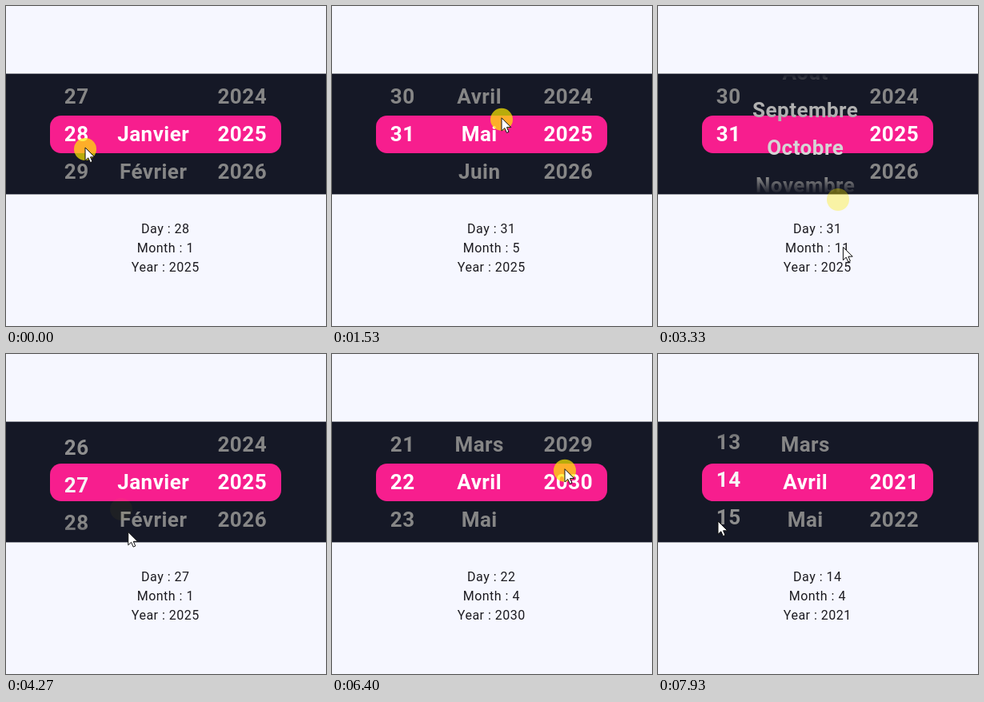
These frames come from a looping animation (400x400 px, 8000 ms). An HTML page:

```html
<!DOCTYPE html>
<html lang="fr">
<head>
<meta charset="utf-8">
<title>Date wheel picker</title>
<style>
  html, body { margin: 0; width: 100%; height: 100%; overflow: hidden; background: #f6f7ff; }
  svg { display: block; width: 100%; height: 100%; }
  text { font-family: Roboto, sans-serif; text-anchor: middle; letter-spacing: .5px; }
  .wheel text { font-size: 26px; font-weight: 700; }
  .label { font-size: 16px; fill: #1c1b20; }
</style>
</head>
<body>
<svg viewBox="0 0 400 400">
  <defs>
    <clipPath id="band"><rect y="85" width="400" height="150"/></clipPath>
    <linearGradient id="fade" x2="0" y2="1">
      <stop stop-color="#151826"/>
      <stop offset="1" stop-color="#151826" stop-opacity="0"/>
    </linearGradient>
  </defs>
  <rect width="400" height="400" fill="#f6f7ff"/>
  <rect y="84.6" width="400" height="150.8" fill="#151826"/>
  <rect x="55" y="137" width="289" height="47" rx="14" fill="#f71e8e"/>
  <g class="wheel" clip-path="url(#band)"></g>
  <rect y="85" width="400" height="20" fill="url(#fade)"/>
  <rect width="400" height="20" fill="url(#fade)" transform="matrix(1 0 0 -1 0 235)"/>
  <text class="label" x="199.3" y="284"></text>
  <text class="label" x="199.3" y="308"></text>
  <text class="label" x="199.3" y="332"></text>
  <circle id="touch" r="14" fill="#ffeb00"/>
  <path id="cursor" d="M0 0V16.3L3.8 12.8 6.4 18.6 9 17.5 6.5 11.8H11.8Z"
        fill="#fff" stroke="#111" stroke-width="1" stroke-linejoin="round"/>
</svg>
<script>
const LOOP = 8000, ROW = 47, CENTER = 160, BASELINE = 9.2;
// Gesture timing in ms: drag, wheel fling, pointer glide after release, pause before a press
const DRAG = 160, FLING = 650, GLIDE = 100, PAUSE = 60;
// Delay of the wheels behind the pointer, of the labels behind the wheels; touch fade-out
const WHEEL_LAG = 40, LABEL_LAG = 25, FADE = 200;
const SLOP = 16, DRIFT = 7;

const easeIn = x => x * x;
const easeOut = x => 1 - (1 - x) ** 2;
const smooth = x => x * x * (3 - 2 * x);
const mix = (a, b, x) => a + (b - a) * x;
const clamp = (x, low, high) => Math.min(high, Math.max(low, x));
const range = (from, to) => Array.from({ length: to - from + 1 }, (_, i) => from + i);

const MONTHS = 'Janvier Février Mars Avril Mai Juin Juillet Août Septembre Octobre Novembre Décembre'.split(' ');
const wheels = [
  { name: 'Day', x: 88.2, first: 1, items: range(1, 31), start: 28 },
  { name: 'Month', x: 184.2, first: 1, items: MONTHS, start: 1 },
  { name: 'Year', x: 295.3, first: 2021, items: range(2021, 2030), start: 2025 }
];

// A vertical drag at x, then a fling to a value; a value past the range stops at its end
const swipe = (wheel, release, x, from, to, end, glide = 31) =>
  ({ wheel: wheels[wheel], press: release - DRAG, release, x, from, to, end, glide, dir: Math.sign(to - from) });

const swipes = [
  swipe(0, 160, 99, 177, 112, 31),
  swipe(1, 820, 185, 190, 104, 5),
  swipe(1, 1680, 212, 140, 104, 11),
  swipe(1, 3260, 225, 212, 240, -1, 67),
  swipe(0, 4085, 144, 138, 192, 22),
  swipe(1, 5020, 184, 214, 122, 4),
  swipe(2, 5700, 290, 200, 120, 2030),
  swipe(2, 6550, 291, 143, 298, 2018),
  swipe(0, 7304, 68, 98, 178, 14)
];

const svg = document.querySelector('svg');
const group = svg.querySelector('.wheel');
const labels = svg.querySelectorAll('.label');
const touch = document.getElementById('touch');
const cursor = document.getElementById('cursor');

for (const wheel of wheels) {
  wheel.swipes = swipes.filter(s => s.wheel === wheel);
  wheel.nodes = wheel.items.map(item => {
    const node = document.createElementNS(svg.namespaceURI, 'text');
    node.textContent = item;
    node.setAttribute('x', wheel.x);
    return group.appendChild(node);
  });
}

const dragY = (s, t) => mix(s.from, s.to, easeIn(clamp((t - s.press) / DRAG, 0, 1)));

function wheelValue(wheel, time) {
  const t = time - WHEEL_LAG;
  const inRange = v => clamp(v, wheel.first, wheel.first + wheel.items.length - 1);
  let value = wheel.start;
  for (const s of wheel.swipes) {
    if (t < s.press) break;
    const travel = Math.max(0, Math.abs(dragY(s, t) - s.from) - SLOP);
    const dragged = value - s.dir * travel / ROW;
    value = inRange(mix(dragged, s.end, easeOut(clamp((t - s.release) / FLING, 0, 1))));
  }
  return value;
}

function pointer(t) {
  const i = swipes.findLastIndex(s => t >= s.press);
  const s = swipes[i], next = swipes[i + 1];
  const k = easeOut(clamp((t - s.release) / GLIDE, 0, 1));
  const x = s.x + DRIFT * k;
  const y = dragY(s, t) + s.dir * s.glide * k;
  if (!next) return [x, y];
  const leave = s.release + GLIDE;
  const move = smooth(clamp((t - leave) / (next.press - PAUSE - leave), 0, 1));
  return [mix(x, next.x, move), mix(y, next.from, move)];
}

function drawWheel(wheel, row, t) {
  const value = wheelValue(wheel, t);
  wheel.nodes.forEach((node, i) => {
    const offset = (wheel.first + i - value) * ROW;
    const rows = Math.abs(offset) / ROW;
    const gray = mix(255, 134, Math.min(1, rows));
    node.setAttribute('visibility', rows < 2 ? 'visible' : 'hidden');
    node.setAttribute('y', CENTER + offset + BASELINE);
    node.setAttribute('fill', `rgb(${gray} ${gray} ${gray})`);
  });
  labels[row].textContent = `${wheel.name} : ${Math.round(wheelValue(wheel, t - LABEL_LAG))}`;
}

function drawPointer(t) {
  cursor.setAttribute('transform', `translate(${pointer(t)})`);
  const s = swipes.find(s => t >= s.press && t < s.release + FADE);
  touch.setAttribute('visibility', s ? 'visible' : 'hidden');
  if (!s) return;
  touch.setAttribute('cx', s.x);
  touch.setAttribute('cy', dragY(s, t) + 2);
  touch.setAttribute('opacity', t < s.release ? .7 : .55 * (1 - (t - s.release) / FADE));
}

const begin = performance.now();
function frame() {
  const t = Math.max(0, performance.now() - begin) % LOOP;
  wheels.forEach((wheel, row) => drawWheel(wheel, row, t));
  drawPointer(t);
  requestAnimationFrame(frame);
}
frame();
</script>
</body>
</html>
```
